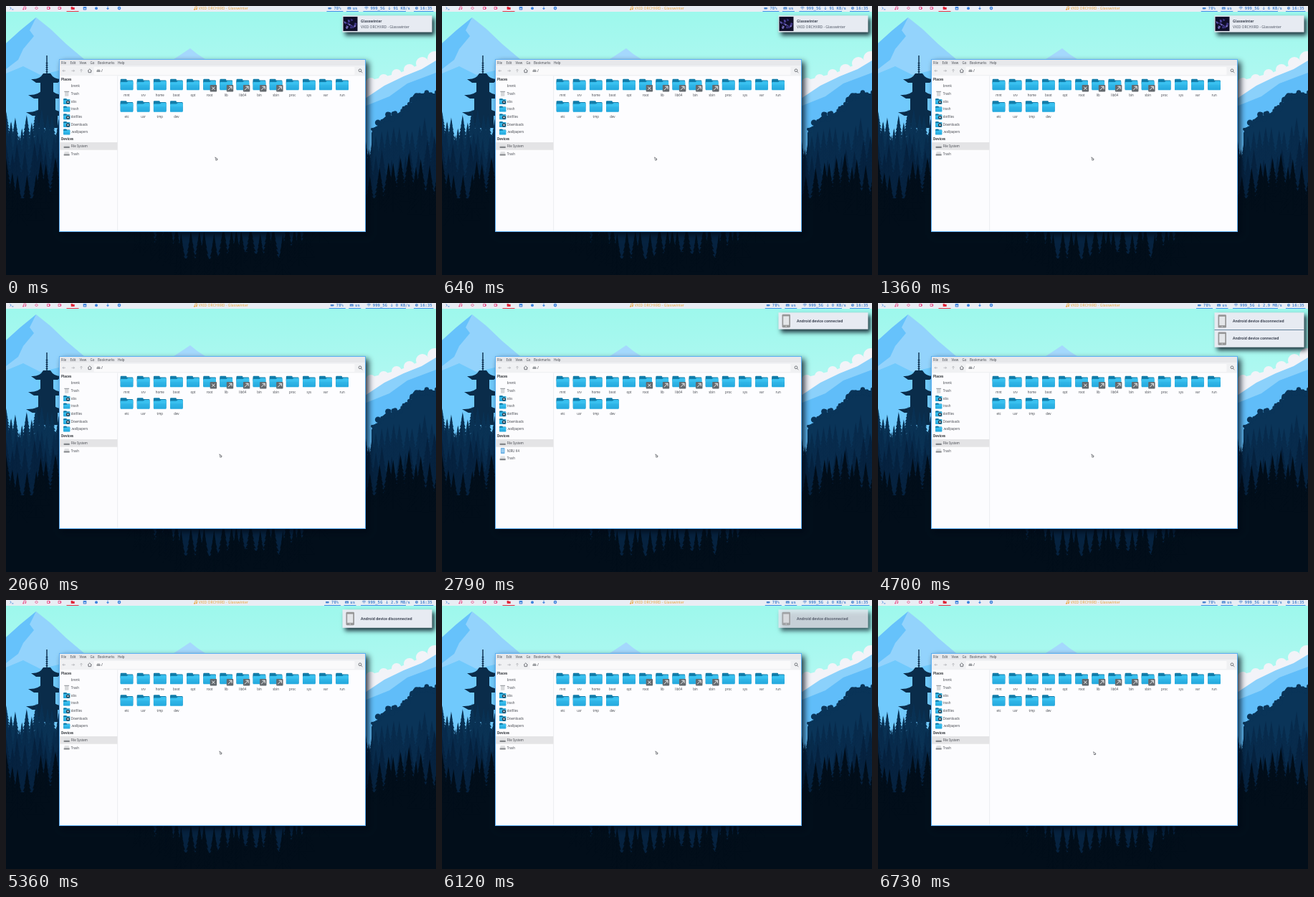
These frames come from a looping animation (600 by 375 pixels, 6.76 s). An HTML page with a canvas:

```html
<!DOCTYPE html>
<html lang="en">
<head>
<meta charset="utf-8">
<title>Desktop notifications</title>
<style>
  html, body { margin: 0; width: 100%; height: 100%; overflow: hidden; }
  canvas { display: block; width: 600px; height: 375px; }
</style>
</head>
<body>
<canvas id="stage"></canvas>
<script>
const W = 600, H = 375, LOOP = 6760;
const SANS = '"Noto Sans", sans-serif';
const MONO = '"DejaVu Sans Mono", monospace';
const ARTIST = 'VXID ORCHXRD', TRACK = 'Glasswinter', PHONE = 'NIRU K4';
const SONG = `${ARTIST} - ${TRACK}`;
const ratio = window.devicePixelRatio || 1;

function setUp(canvas) {
  canvas.width = W * ratio;
  canvas.height = H * ratio;
  const context = canvas.getContext('2d');
  context.scale(ratio, ratio);
  return context;
}

const screen = setUp(document.getElementById('stage'));
let g = screen;

function rect(x, y, w, h, color) {
  g.fillStyle = color;
  g.fillRect(x, y, w, h);
}

function round(x, y, w, h, r, color) {
  g.fillStyle = color;
  g.beginPath();
  g.roundRect(x, y, w, h, r);
  g.fill();
}

function dot(x, y, r, color) {
  g.fillStyle = color;
  g.beginPath();
  g.arc(x, y, r, 0, 7);
  g.fill();
}

function poly(color, ...points) {
  g.fillStyle = color;
  g.beginPath();
  for (let i = 0; i < points.length; i += 2) g.lineTo(points[i], points[i + 1]);
  g.fill();
}

function line(color, width, ...points) {
  g.strokeStyle = color;
  g.lineWidth = width;
  g.beginPath();
  for (let i = 0; i < points.length; i += 2) g.lineTo(points[i], points[i + 1]);
  g.stroke();
}

function text(value, x, y, color, font, align = 'left') {
  g.font = font;
  g.fillStyle = color;
  g.textAlign = align;
  g.fillText(value, x, y);
}

function withShadow(color, blur, dx, dy, paint) {
  g.save();
  g.shadowColor = color;
  g.shadowBlur = blur * ratio;
  g.shadowOffsetX = dx * ratio;
  g.shadowOffsetY = dy * ratio;
  paint();
  g.restore();
}

function ease(t, from, to) {
  const k = Math.min(1, Math.max(0, (t - from) / (to - from)));
  return k * k * (3 - 2 * k);
}

function seeded(seed) {
  return () => (seed = (seed * 16807) % 2147483647) / 2147483647;
}

// Wallpaper

function conifer(x, top, height, color) {
  const tiers = 8;
  for (let i = 1; i <= tiers; i++) {
    const y = top + height * i / tiers;
    const reach = height * 0.026 * i + 0.7;
    poly(color, x, y - height * 0.26, x + reach, y, x - reach, y);
  }
  rect(x - 0.4, top - 2, 0.8, height, color);
}

function forest(ridge, color, seed, step, height, from = 0, to = W) {
  const random = seeded(seed);
  g.fillStyle = color;
  g.beginPath();
  g.moveTo(from, H);
  for (let x = from; x <= to; x += 5) g.lineTo(x, ridge(x) + height * 0.75);
  g.lineTo(to, H);
  g.fill();
  for (let x = from; x < to + 5; x += step * (0.6 + random() * 0.8)) {
    conifer(x, ridge(x) + (random() - 0.4) * height * 0.5, height * (0.9 + random() * 0.5), color);
  }
}

function foliage(color) {
  const random = seeded(31);
  const crown = x => 176 - 58 * ease(x, 505, 592) - 15 * Math.exp(-(((x - 528) / 14) ** 2));
  g.fillStyle = color;
  g.beginPath();
  g.moveTo(510, H);
  for (let x = 510; x <= W; x += 5) g.lineTo(x, crown(x) + 4);
  g.lineTo(W, H);
  g.fill();
  for (let x = 511; x < W + 4; x += 2) {
    dot(x, crown(x) + random() * 10, 1.8 + random() * 2.4, color);
  }
}

function pagoda(color) {
  line(color, 1.4, 57, 69, 57, 100);
  for (let y = 79; y < 96; y += 3) rect(55.6, y, 2.8, 1.2, color);
  [[97, 20, 9], [119, 24, 12], [143, 27, 15]].forEach(([y, eave, wall]) => {
    g.fillStyle = color;
    g.beginPath();
    g.moveTo(57 - eave - 2, y + 5);
    g.quadraticCurveTo(57 - eave * 0.5, y + 6, 57 - eave * 0.25, y - 3);
    g.lineTo(57 + eave * 0.25, y - 3);
    g.quadraticCurveTo(57 + eave * 0.5, y + 6, 57 + eave + 2, y + 5);
    g.lineTo(57 + eave * 0.75, y + 10);
    g.lineTo(57 - eave * 0.75, y + 10);
    g.fill();
    rect(57 - wall, y + 9, wall * 2, 18, color);
  });
}

function wallpaper() {
  const sky = g.createLinearGradient(0, 0, 0, 130);
  sky.addColorStop(0, '#9cf8ec');
  sky.addColorStop(1, '#b4f8f2');
  rect(0, 0, W, H, sky);

  poly('#93d3fc', 0, 52, 20, 34, 42, 16, 62, 32, 84, 53, 116, 80, 116, 200, 0, 200);
  poly('#66c2fb', 42, 16, 33, 34, 39, 42, 24, 60, 17, 75, 0, 88, 0, 52, 20, 34);
  poly('#70c9fc', 0, 94, 24, 84, 48, 96, 82, 88, 82, 200, 0, 200);
  poly('#a5d8fd', 228, 78, 245, 67, 257, 59, 267, 67, 284, 78);

  [[598, 73, 10], [581, 80, 9], [563, 89, 8], [545, 95, 7], [527, 102, 7], [509, 107, 7]]
    .forEach(([x, y, r]) => dot(x, y, r, '#f2f3f8'));
  poly('#f2f3f8', 495, 107, 550, 93, 600, 72, 600, 140, 495, 140);
  poly('#8bd1fb', 495, 133, 528, 111, 555, 98, 580, 88, 600, 76, 600, 210, 495, 210);
  poly('#60bdf9', 495, 142, 535, 126, 560, 108, 600, 93, 600, 210, 495, 210);

  foliage('#0a3458');
  pagoda('#0a2c4a');
  forest(x => 158 + Math.sin(x / 12) * 8, '#0a3254', 47, 7, 34, 0, 90);
  forest(x => 178 + Math.sin(x / 25) * 7, '#082b4c', 53, 8, 42);
  forest(x => 200 + Math.sin(x / 28 + 1) * 8, '#06223f', 23, 10, 48);
  forest(x => 228 + 86 * Math.exp(-(((x - 300) / 140) ** 6)) + Math.sin(x / 19) * 6, '#020e1a', 19, 10, 46);
}

// File manager

function folder(x, y, scale = 1) {
  g.save();
  g.translate(x, y);
  g.scale(scale, scale);
  round(-9, -8, 9, 7, 1.2, '#117ca9');
  round(-9, -6, 18, 13, 1.2, '#117ca9');
  const face = g.createLinearGradient(0, -4, 0, 8);
  face.addColorStop(0, '#39c0ef');
  face.addColorStop(1, '#23a8dd');
  round(-9, -3.5, 18, 11.5, 1.2, face);
  poly('#39c0ef', -9, -2.5, -1, -2.5, 2, -5, 8.2, -5, 9, -4.2, 9, 0, -9, 0);
  g.restore();
}

function emblem(x, y, kind) {
  round(x - 4.7, y - 4.7, 9.4, 9.4, 1, '#63696e');
  if (kind === 'x') {
    line('#fff', 0.9, x - 2, y - 2, x + 2, y + 2);
    line('#fff', 0.9, x + 2, y - 2, x - 2, y + 2);
  } else {
    line('#fff', 0.9, x - 2.6, y + 2.6, x + 2.4, y - 2.4);
    line('#fff', 0.9, x - 1.2, y - 2.5, x + 2.5, y - 2.5, x + 2.5, y + 1.2);
  }
}

function fileGrid() {
  const rows = [
    ['mnt', 'srv', 'home', 'boot', 'opt', 'root', 'lib', 'lib64', 'bin', 'sbin', 'proc', 'sys', 'var', 'run'],
    ['etc', 'usr', 'tmp', 'dev']
  ];
  rows.forEach((names, row) => names.forEach((name, i) => {
    const x = 168.5 + i * 23.12, y = 110 + row * 30.5;
    folder(x, y - 0.5, 0.98);
    if (name === 'root') emblem(x + 5.3, y + 4.7, 'x');
    if (/lib|bin/.test(name)) emblem(x + 5.3, y + 4.7, 'link');
    text(name, x, y + 15.5, '#4a4d54', `4.4px ${SANS}`, 'center');
  }));
}

function toolbar() {
  rect(74, 75, 428, 8.5, '#e7e8eb');
  rect(74, 83.5, 428, 14, '#f0f1f3');
  [['File', 77], ['Edit', 89.5], ['View', 102.5], ['Go', 117.5], ['Bookmarks', 128], ['Help', 156]]
    .forEach(([name, x]) => text(name, x, 80.8, '#4a4d54', `4.4px ${SANS}`));
  round(122.5, 85, 364, 11, 1, '#fafafb');
  const arrow = (x, dx, dy) => {
    line('#a6a8ac', 0.7, x - dx * 2, 90.3 - dy * 2, x + dx * 2, 90.3 + dy * 2);
    line('#a6a8ac', 0.7, x + dx * 0.5 - dy * 1.5, 90.3 + dy * 0.5 - dx * 1.5,
      x + dx * 2, 90.3 + dy * 2, x + dx * 0.5 + dy * 1.5, 90.3 + dy * 0.5 + dx * 1.5);
  };
  arrow(81, -1, 0);
  arrow(93.5, 1, 0);
  arrow(105, 0, -1);
  line('#565960', 0.8, 114, 90.5, 116.8, 87.8, 119.6, 90.5);
  line('#565960', 0.8, 115, 90, 115, 92.7, 118.6, 92.7, 118.6, 90);
  poly('#a9abaf', 127.3, 88.6, 130.8, 88.6, 131.6, 90.4, 126.5, 90.4);
  rect(126.5, 90.3, 5.1, 1.4, '#7c7f84');
  text('/', 133, 92.2, '#33363b', `5px ${SANS}`);
  g.beginPath();
  g.arc(494, 89.8, 1.9, 0, 7);
  g.strokeStyle = '#5b5e64';
  g.stroke();
  line('#5b5e64', 0.8, 495.4, 91.2, 497.3, 93);
}

function sidebarIcon(kind, y) {
  const x = 84.7;
  if (kind === 'trash') {
    round(x - 2.7, y - 2.5, 5.4, 6, 0.7, '#d6d8da');
    rect(x - 3.4, y - 3.5, 6.8, 1, '#8c8f94');
  } else if (kind === 'drive') {
    poly('#e0e1e3', x - 2.9, y - 3, x + 2.9, y - 3, x + 4, y + 1, x - 4, y + 1);
    round(x - 4, y + 0.4, 8, 2.2, 0.5, '#83868a');
  } else if (kind === 'phone') {
    round(x - 2.8, y - 4, 5.6, 8, 0.8, '#6bafe3');
    rect(x - 2, y - 2.8, 4, 5.1, '#99cdf1');
  } else if (kind) {
    folder(x, y, 0.5);
    if (kind === 'marked') {
      dot(x + 1.8, y + 1, 2.6, '#2b4557');
      dot(x + 1.8, y + 1, 1.1, '#d9e8f0');
    }
  }
}

function sidebar(phonePlugged) {
  rect(74, 97.5, 82, 217, '#fcfcfe');
  rect(155.5, 97.5, 0.6, 217, '#dfe1e5');
  rect(75, 190, 80.5, 10.7, '#e4e4e6');
  const heading = (name, y) => text(name, 77, y, '#303338', `bold 4.5px ${SANS}`);
  heading('Places', 103.5);
  heading('Devices', 187);
  const entries = [
    ['brenk', 111.8], ['Trash', 122.3, 'trash'], ['obs', 133, 'marked'], ['trash', 143.6, 'folder'],
    ['dotfiles', 154.3, 'marked'], ['Downloads', 164.9, 'marked'], ['.wallpapers', 175.5, 'folder'],
    ['File System', 195.3, 'drive']
  ];
  if (phonePlugged) entries.push([PHONE, 206, 'phone']);
  entries.push(['Trash', phonePlugged ? 216.6 : 206, 'drive']);
  entries.forEach(([name, y, icon]) => {
    sidebarIcon(icon, y);
    text(name, 90.8, y + 1.6, '#4a4d54', `4.4px ${SANS}`);
  });
}

function fileManager() {
  withShadow('rgba(0,8,20,.8)', 8, 4, 4, () => rect(74, 74, 428, 241, '#fdfdff'));
  toolbar();
  fileGrid();
}

// Top bar

function workspaceIcon(i, x) {
  const pink = '#e8417e', blue = '#3e83dc';
  const color = i && i < 5 ? pink : blue;
  if (i === 0) {
    line(color, 0.8, x - 2.5, 1.5, x - 0.7, 3.1, x - 2.5, 4.7);
    line(color, 0.8, x, 4.9, x + 2.5, 4.9);
  } else if (i === 1) {
    line(color, 0.8, x - 1.2, 4.5, x - 1.2, 1.2, x + 1.8, 1.2, x + 1.8, 4);
    dot(x - 1.9, 4.5, 0.9, color);
    dot(x + 1.1, 4.1, 0.9, color);
  } else if (i === 2) {
    line(color, 0.8, x, 1, x + 2, 3, x, 5, x - 2, 3, x, 1);
  } else if (i < 5) {
    line(color, 0.8, x - 2, 1.5, x + 1.5, 1.5, x + 1.5, 4.5, x - 2, 4.5, x - 2, 1.5);
    dot(x + 1.4, 3, 1, color);
  } else if (i === 5) {
    round(x - 2.3, 1.8, 5, 3.2, 0.6, '#df2638');
    rect(x - 2.3, 1, 2.3, 1.5, '#df2638');
    rect(84.5, 7, 17, 1, '#ef3449');
  } else if (i === 6) {
    round(x - 2.3, 1, 4.6, 4.4, 0.6, color);
    rect(x - 1.2, 3.2, 2.4, 1.2, '#e9edf4');
  } else if (i === 7) {
    dot(x, 3.2, 2, color);
  } else if (i === 8) {
    line(color, 1, x, 0.8, x, 4);
    poly(color, x - 2, 3, x + 2, 3, x, 5.2);
  } else {
    dot(x, 3.1, 2.3, color);
    dot(x, 3.1, 0.8, '#e9edf4');
  }
}

function topBar() {
  rect(0, 0, W, 8, '#e9edf4');
  [8, 26, 42.5, 59.5, 75, 93, 110, 126, 142, 158].forEach((x, i) => workspaceIcon(i, x));
  const orange = '#e9a33d';
  line(orange, 0.8, 263.8, 4.8, 263.8, 1.3, 266.5, 0.9, 266.5, 4.2);
  dot(263, 4.8, 1, orange);
  dot(265.7, 4.3, 1, orange);
  text(SONG, 268.7, 4.9, orange, `5.1px ${SANS}`);
}

function statusArea(speed) {
  const ink = '#4c86cf', font = `bold 5.6px ${MONO}`, char = 3.37;
  const label = (value, x) => text(value, x, 5, ink, font);
  const underline = (x, w) => rect(x, 7, w, 1, '#478fe9');
  dot(573, 3.1, 2, ink);
  line('#e9edf4', 0.6, 573, 1.8, 573, 3.3, 574, 3.3);
  label('16:35', 577.8);
  underline(569, 27.5);

  const speedX = 564 - speed.length * char;
  label(speed, speedX);
  line(ink, 0.8, speedX - 5.5, 1, speedX - 5.5, 5);
  line(ink, 0.8, speedX - 6.8, 3.7, speedX - 5.5, 5, speedX - 4.2, 3.7);
  const wifiX = speedX - 41;
  g.strokeStyle = ink;
  g.lineWidth = 0.8;
  [1.2, 2.6, 4].forEach(r => {
    g.beginPath();
    g.arc(wifiX + 3.5, 5.2, r, -2.3, -0.85);
    g.stroke();
  });
  label('999_5G', wifiX + 9);
  underline(wifiX - 1, 34);
  underline(speedX - 8, 572 - speedX - 6);

  const keysX = speedX - 64;
  round(keysX, 1.4, 5, 3.4, 0.5, ink);
  rect(keysX + 1, 3.6, 3, 0.5, '#e9edf4');
  label('us', keysX + 7.3);
  underline(keysX - 1.5, 17);

  const batteryX = speedX - 91;
  round(batteryX, 1.9, 4.3, 2.6, 0.4, ink);
  rect(batteryX + 4.3, 2.5, 0.6, 1.4, ink);
  label('78%', batteryX + 8);
  underline(batteryX - 2, 23);
}

// Notifications

function albumArt(x, y) {
  const random = seeded(71);
  rect(x, y, 20, 20, '#100e28');
  for (let i = 0; i < 16; i++) {
    const px = x + 1 + random() * 15, py = y + 1 + random() * 15;
    poly(i % 3 ? '#453b92' : '#8379cc', px, py, px + 3.5, py + random() * 3, px + 1, py + 3.5);
  }
}

function notification(rows, rowHeight, alpha) {
  if (alpha <= 0) return;
  const x = 469.5, y = 13.3, w = 125, h = rowHeight * rows.length;
  g.save();
  g.globalAlpha = alpha;
  withShadow('rgba(0,10,25,.8)', 6, 3, 4, () => rect(x, y, w, h, '#e7ebf2'));
  rows.forEach((title, i) => {
    const mid = y + rowHeight * (i + 0.5);
    if (i) rect(x, mid - rowHeight / 2 - 0.5, w, 1, '#65839c');
    if (title === TRACK) {
      albumArt(470.5, mid - 10);
      text(title, 495, mid - 2.3, '#3e4554', `bold 5px ${SANS}`);
      text(SONG, 495, mid + 5.7, '#505765', `5px ${SANS}`);
    } else {
      round(474.5, mid - 9.2, 11.5, 18.4, 1.4, '#969697');
      rect(476.2, mid - 6.5, 8.1, 12.2, '#e4e6e9');
      dot(480.2, mid + 7.5, 0.7, '#e4e6e9');
      text(title, 495, mid + 1.8, '#3e4554', `bold 5px ${SANS}`);
    }
  });
  g.restore();
}

function notifications(t) {
  const on = 'Android device connected', off = 'Android device disconnected';
  if (t < 1850) notification([TRACK], 23.2, 1 - ease(t, 1700, 1850));
  else if (t < 3180) notification([on], 23.3, ease(t, 2280, 2430));
  else if (t < 5000) notification([off, on], 23.3 + 0.9 * ease(t, 3480, 4000), 1);
  else notification([off], 25.5, 1 - ease(t, 6080, 6230));
}

function pointer(t) {
  const x = 291.5 + 6 * ease(t, 150, 850) + 2.8 * ease(t, 6590, 6730);
  const y = 210.3 + 0.7 * ease(t, 6590, 6730);
  poly('#55585e', x, y, x + 4, y + 3, x + 3.1, y + 5, x + 0.9, y + 5);
  poly('#f5f5f6', x + 0.8, y + 1.3, x + 3, y + 3.1, x + 2.5, y + 4.2, x + 1.2, y + 4.2);
}

function networkSpeed(t) {
  if (t < 980) return '91 KB/s';
  if (t < 1970) return '6 KB/s';
  return t >= 3970 && t < 5970 ? '2.9 MB/s' : '0 KB/s';
}

// The parts that never change are painted once.
const backdrop = document.createElement('canvas');
g = setUp(backdrop);
wallpaper();
fileManager();
topBar();
g = screen;

function render(now) {
  const t = now % LOOP;
  g.drawImage(backdrop, 0, 0, W, H);
  sidebar(t >= 2240 && t < 3120);
  g.strokeStyle = '#5ab0f5';
  g.lineWidth = 1;
  g.strokeRect(74.5, 74.5, 427, 240);
  statusArea(networkSpeed(t));
  notifications(t);
  pointer(t);
}

const start = performance.now();
function tick() {
  render(performance.now() - start);
  requestAnimationFrame(tick);
}
tick();
</script>
</body>
</html>
```
